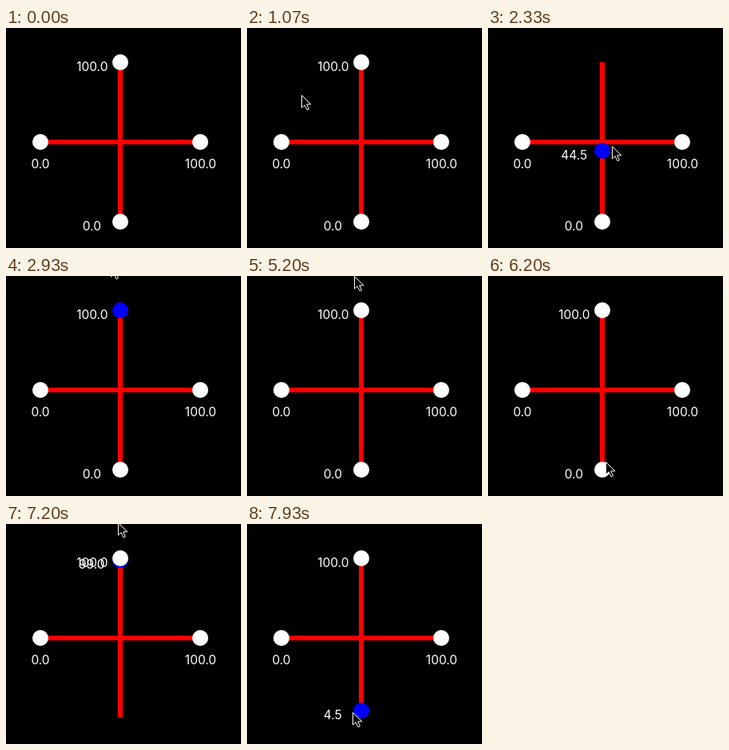
Write an HTML page that moves like this. It is 294 px wide and 276 px high and loops after 8 s.

```html
<!DOCTYPE html>
<html lang="en">
<head>
<meta charset="utf-8">
<title>Cross sliders</title>
<style>
  html, body { margin: 0; width: 100%; height: 100%; overflow: hidden; background: #000; }
  svg { display: block; width: 100vw; height: 100vh; }
  text { font: 15.5px Inter, "Open Sans", sans-serif; fill: #fff; text-anchor: middle; }
</style>
</head>
<body>
<svg viewBox="0 0 294 276">
  <path d="M43 143H243M143 43V243" stroke="#f00" stroke-width="6"/>
  <g fill="#fff">
    <circle cx="43" cy="143" r="10"/>
    <circle cx="243" cy="143" r="10"/>
    <circle id="lowKnob" cx="143" r="10"/>
    <circle id="highKnob" cx="143" r="10"/>
  </g>
  <text x="43" y="176">0.0</text>
  <text x="243.5" y="176">100.0</text>
  <text id="lowText" x="107.3"></text>
  <text id="highText" x="107.8"></text>
  <path id="cursor" d="M-.5 .5V16L3 12.7L6 18.8L8.4 17.7L5.7 11.8H10.8Z" fill="#000" stroke="#fff"/>
</svg>
<script>
const LOOP = 8000, STEP = 1000 / 15, LAG = 16, TOP = 43, BOTTOM = 243;
const $ = id => document.getElementById(id);
const clamp = (v, lo, hi) => Math.min(hi, Math.max(lo, v));
const ease = k => (1 - Math.cos(Math.PI * clamp(k, 0, 1))) / 2;

// Pointer strokes after the opening sweep
const strokes = [
  { from: 1600, to: 2000, x: 167, y: 219 },
  { from: 2000, to: 2900, x: 132, y: -15 },
  { from: 5133, to: 5200, x: 135, y: 0 },
  { from: 5200, to: 5933, x: 148, y: 241 },
  { from: 6067, to: 6200, x: 148, y: 233 },
  { from: 6667, to: 7267, x: 141, y: -9 },
  { from: 7400, to: 7950, x: 133, y: 236.3 }
];

function pointer(t) {
  // Sweep clockwise from the right, ending on the top knob
  const a = ease((t - 600) / 670) * 1.5 * Math.PI;
  let x = 150 + 97 * Math.cos(a), y = 130 + 85 * Math.sin(a);
  for (const s of strokes) {
    const k = ease((t - s.from) / (s.to - s.from));
    x += (s.x - x) * k;
    y += (s.y - y) * k;
  }
  return { x, y };
}

// A held knob trails the pointer and stops at the end of its track
const dragged = (t, top) => Math.round(clamp(pointer(t - LAG).y, top, BOTTOM));

function place(name, y, active) {
  const knob = $(name + "Knob"), label = $(name + "Text");
  knob.setAttribute("cy", y);
  knob.setAttribute("fill", active ? "#00f" : "#fff");
  label.setAttribute("y", y + 11);
  label.textContent = ((BOTTOM - y) / 2).toFixed(1);
}

function draw(ms) {
  const t = Math.floor((ms % LOOP + 5) / STEP) * STEP % LOOP;
  const high = t > 1599 && t < 5199;
  const low = t > 6660;
  place("high", high ? dragged(t, TOP) : TOP, high);
  place("low", low ? dragged(t, TOP + 2) : BOTTOM, low);

  const p = pointer(t);
  $("cursor").setAttribute("transform", `translate(${Math.round(p.x)} ${Math.round(p.y)})`);
  $("cursor").setAttribute("visibility", t > 599 ? "visible" : "hidden");
}

const start = performance.now();
function tick() {
  draw(performance.now() - start);
  requestAnimationFrame(tick);
}
tick();
</script>
</body>
</html>
```
